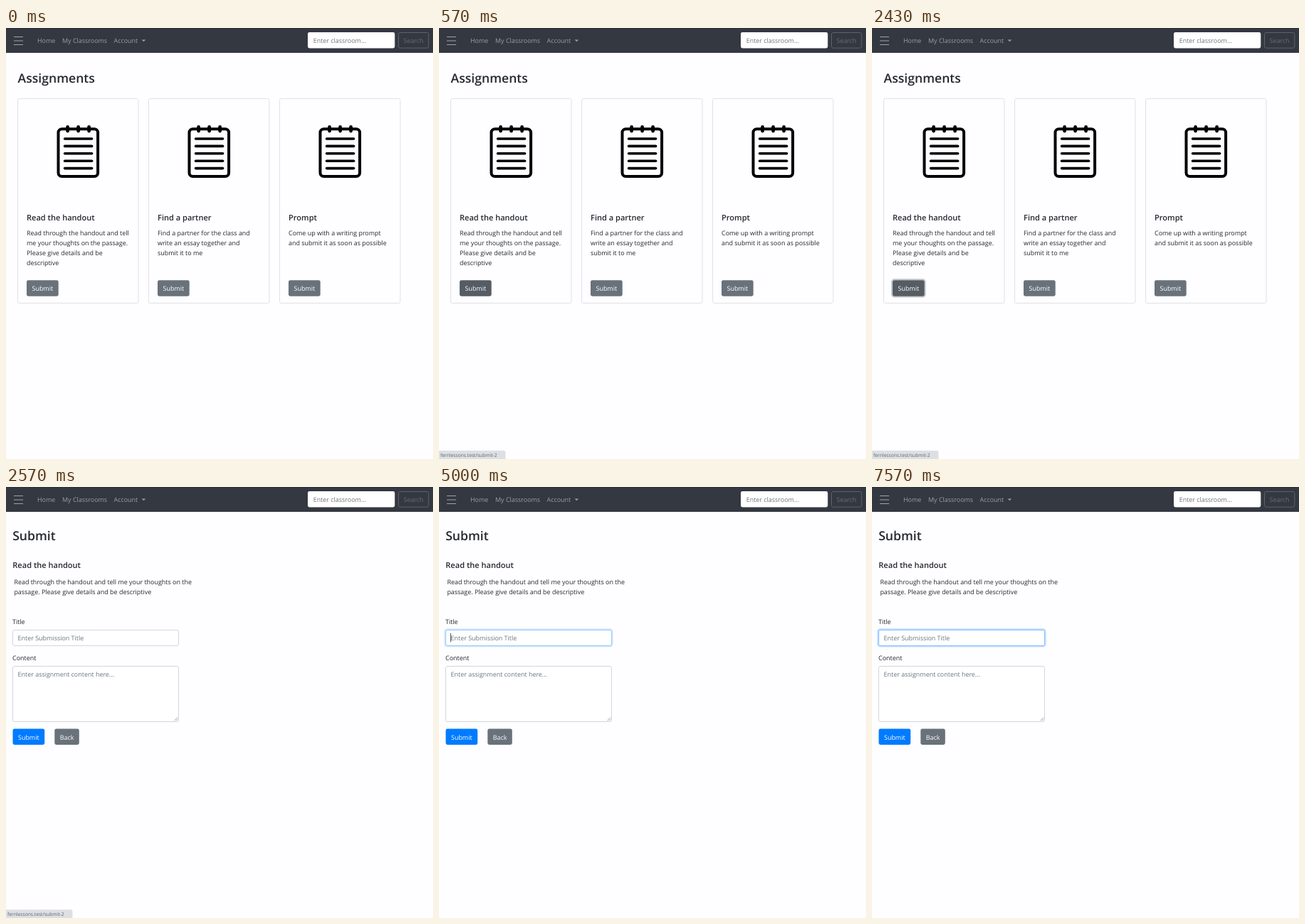
An HTML page for the animation above (8 s loop, 600 px wide and 607 px high).

```html
<!DOCTYPE html>
<html lang="en">
<head>
<meta charset="utf-8">
<title>Assignments</title>
<style>
  html, body { margin: 0; width: 100%; height: 100%; overflow: hidden; background: #fefdff; }
  svg { display: block; width: 600px; height: 607px; font-family: "Open Sans", sans-serif; text-rendering: geometricPrecision; }
  text { font-size: 8.95px; fill: #24292e; white-space: pre; }
  .h2 { font-size: 17.6px; font-weight: 600; }
  .h5 { font-size: 11.05px; font-weight: 600; }
  .nav { fill: #9c9ea3; }
  .hint { fill: #6c757d; }
  .dim { fill: #686f77; }
  .btn { fill: #fff; }
  .tip { font-size: 6.7px; fill: #5f6368; }
</style>
</head>
<body>
<svg id="stage" viewBox="0 0 600 607"></svg>
<script>
const stage = document.getElementById("stage");
const LOOP = 8000;
const GREY = "#69727b", DARK = "#565c63", BLUE = "#007bff", LINE = "#d3d6dc";

function add(parent, tag, attrs, content) {
  const el = document.createElementNS("http://www.w3.org/2000/svg", tag);
  for (const key in attrs) el.setAttribute(key, attrs[key]);
  if (content) el.textContent = content;
  parent.append(el);
  return el;
}
const group = (parent, attrs = {}) => add(parent, "g", attrs);
const label = (parent, x, y, content, style = "") => add(parent, "text", { x, y, class: style }, content);
const box = (parent, x, y, width, height, fill, stroke = "none", rx = 2.4) =>
  add(parent, "rect", { x, y, width, height, fill, stroke, rx });
const path = (parent, d, stroke, width, cap = "butt") =>
  add(parent, "path", { d, fill: "none", stroke, "stroke-width": width, "stroke-linecap": cap });

function button(parent, x, y, width, content, fill) {
  const face = box(parent, x, y, width, 22.5, fill);
  label(parent, x + 7.5, y + 15, content, "btn");
  return face;
}

function notepad(parent) {
  add(parent, "rect", { x: 73.5, y: 142.3, width: 55.6, height: 66.7, rx: 5, fill: "none", stroke: "#000", "stroke-width": 4 });
  for (const x of [86.6, 101.6, 116.6]) path(parent, `M${x} 139.4V145`, "#000", 4.8, "round");
  for (let i = 0; i < 5; i++) path(parent, `M82.6 ${156 + i * 10.4}H120.6`, "#000", 3.6, "round");
}

function card(parent, index, title, lines) {
  const g = group(parent, { transform: `translate(${index * 184})` });
  box(g, 16.5, 99.5, 169.5, 288, "none", "#e1e0e5");
  notepad(g);
  label(g, 29, 271.3, title, "h5");
  lines.forEach((line, i) => label(g, 29, 291.8 + i * 14.1, line));
  const ring = box(g, 28, 354.2, 46.5, 24.4, "none", "#c1c5c9", 3.4);
  ring.setAttribute("stroke-width", 2);
  ring.setAttribute("opacity", 0);
  return { ring, face: button(g, 29, 355.2, 44.7, "Submit", GREY) };
}

// Navigation bar
box(stage, 0, 0, 600, 35, "#343840", "none", 0);
box(stage, 0, 0, 600, 1, "#2b2e36", "none", 0);
path(stage, "M11 12.5H24M11 18H24M11 23.5H24", "#a0a2a6", 1.2);
label(stage, 44, 20.9, "Home", "nav");
label(stage, 79, 20.9, "My Classrooms", "nav");
label(stage, 151.5, 20.9, "Account", "nav");
add(stage, "path", { d: "M190.6 16.4H196.2L193.4 19.3Z", fill: "#9c9ea3" });
box(stage, 424, 6, 122.3, 22.5, "#fff");
label(stage, 431.7, 21.1, "Enter classroom...", "hint");
box(stage, 551.5, 6.5, 42.3, 21.7, "none", "#5d636b");
label(stage, 558.5, 20.9, "Search", "dim");

// List of assignments
const list = group(stage);
label(list, 16.6, 77, "Assignments", "h2");
const first = card(list, 0, "Read the handout", [
  "Read through the handout and tell",
  "me your thoughts on the passage.",
  "Please give details and be",
  "descriptive"
]);
card(list, 1, "Find a partner", [
  "Find a partner for the class and",
  "write an essay together and",
  "submit it to me"
]);
card(list, 2, "Prompt", [
  "Come up with a writing prompt",
  "and submit it as soon as possible"
]);

// Submission form
const form = group(stage);
label(form, 9.2, 74.8, "Submit", "h2");
label(form, 9.3, 113.6, "Read the handout", "h5");
label(form, 11.4, 136.6, "Read through the handout and tell me your thoughts on the");
label(form, 11.4, 150.7, "passage. Please give details and be descriptive");
label(form, 9, 193, "Title");
const glow = box(form, 8.4, 200.4, 235, 24, "none", "#bfdeff", 3.4);
glow.setAttribute("stroke-width", 2.4);
const field = box(form, 9.5, 201.5, 233, 22, "#fff", LINE);
label(form, 16.6, 216.2, "Enter Submission Title", "hint");
const caret = box(form, 16, 206, 1, 12.5, "#4a5057", "none", 0);
label(form, 9, 244, "Content");
box(form, 9.5, 252.5, 233, 78, "#fff", LINE);
label(form, 16.6, 266.7, "Enter assignment content here...", "hint");
path(form, "M236.5 329.2L241.2 324.5M239.2 329.2L241.2 327.2", "#85888d", 0.8);
button(form, 9.5, 340.5, 44.7, "Submit", BLUE);
button(form, 68.3, 340.5, 34.5, "Back", GREY);

// Link preview in the corner
const tip = group(stage);
const tipBox = add(tip, "path", { d: "M0 595.3H91Q93.4 595.3 93.4 597.7V607H0Z", fill: "#dcdfe4" });
label(tip, 2, 604, "fernlessons.test/submit-2", "tip");

// Each track lists [time, value]; a value holds until the next one
const tracks = [
  [first.face, "fill", [[0, GREY], [290, "#666f77"], [430, DARK]]],
  [first.ring, "opacity", [[0, 0], [2290, 0.5], [2430, 1]]],
  [list, "display", [[0, "inline"], [2570, "none"]]],
  [form, "display", [[0, "none"], [2570, "inline"]]],
  [tip, "opacity", [[0, 0], [430, 0.4], [570, 1], [2860, 0.4], [3000, 0]]],
  [tipBox, "opacity", [[0, 0], [570, 1]]],
  [glow, "opacity", [[0, 0], [5000, 0.65], [5140, 1]]],
  [field, "stroke", [[0, LINE], [5000, "#98c8fb"], [5140, "#86c0ff"]]],
  [caret, "opacity", [[0, 0], [5000, 1], [5430, 0], [6000, 1], [6570, 0], [7140, 1], [7570, 0]]]
];

function draw() {
  const t = performance.now() % LOOP;
  for (const [el, name, steps] of tracks) {
    const [, value] = steps.findLast(([start]) => start <= t);
    el.setAttribute(name, value);
  }
  requestAnimationFrame(draw);
}
draw();
</script>
</body>
</html>
```
